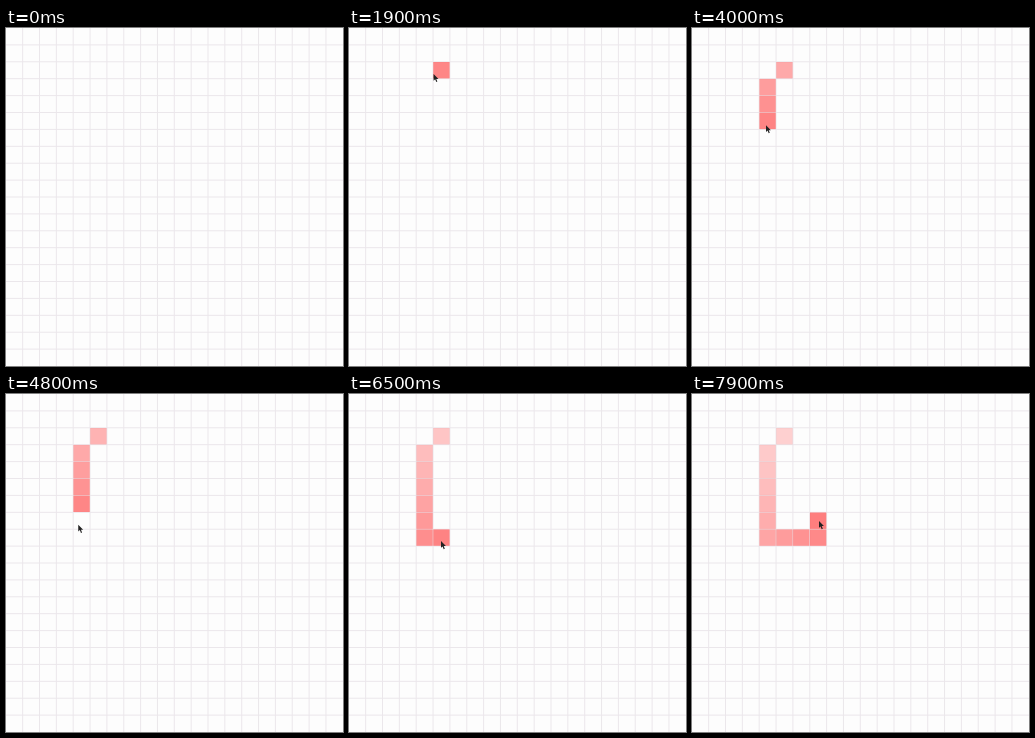
Write an HTML page that moves like this. It is 337 px wide and 338 px high and loops after 8 s.

```html
<!DOCTYPE html>
<html lang="en">
<head>
<meta charset="utf-8">
<title>Grid trail</title>
<style>
html, body { margin: 0; width: 100%; height: 100%; overflow: hidden; background: #fdfdfd; }
svg { display: block; width: 100%; height: 100%; }
</style>
</head>
<body>
<svg viewBox="0 0 337 338">
  <rect width="337" height="338" fill="#fdfdfd"/>
  <g id="grid" fill="#ebe7eb"></g>
  <g id="cells" fill="#f00"></g>
  <path id="cursor" d="M0 0V6.8L1.6 5.4 2.7 8.2 3.8 7.7 2.7 5H4.9Z" fill="#222"/>
</svg>
<script>
const LOOP = 8000, STEP = 100, COLS = 20;
const PX = 16.85, PY = 16.9;
const ENTER = 300, ARRIVE = 1100;
const byId = id => document.getElementById(id);

// Where the pointer clicks, after its entry point
const entry = [11, 159];
const stops = [
  [87, 37], [81, 59], [75, 78], [74, 97], [74, 108], [72, 134],
  [73, 143], [92, 147], [113, 145], [125, 143], [127, 127]
];

// Clicks follow each other ever faster
const clickTime = i => 1500 + 780 * i - 14 * i * i;

const ramp = (t, a, b) => Math.min(1, Math.max(0, (t - a) / (b - a)));
const smooth = k => k * k * (3 - 2 * k);
const mix = (a, b, k) => a.map((v, i) => v + (b[i] - v) * k);

function rect(parent, x, y, width, height) {
  const el = document.createElementNS("http://www.w3.org/2000/svg", "rect");
  for (const [k, v] of Object.entries({ x, y, width, height })) el.setAttribute(k, v);
  return byId(parent).appendChild(el);
}

for (let i = 1; i < COLS; i++) {
  rect("grid", i * PX - 0.7, 0, 1, 338);
  rect("grid", 0, i * PY - 0.5, 337, 1);
}

// Each click fills the square under the pointer
const cells = stops.map(([x, y]) =>
  rect("cells", Math.floor(x / PX) * PX, Math.floor(y / PY) * PY + 0.2, PX - 0.5, PY - 0.5));

function pointerAt(t) {
  if (t < clickTime(0)) return mix(entry, stops[0], ramp(t, ENTER, ARRIVE));
  const i = stops.findLastIndex((_, n) => t >= clickTime(n));
  const next = stops[i + 1] || stops[i];
  const part = ramp(t, clickTime(i), clickTime(i + 1));
  return mix(stops[i], next, smooth(ramp(part, 0.4, 0.68)));
}

function draw(t) {
  cells.forEach((el, i) => {
    const age = (t - clickTime(i)) / 1000;
    el.setAttribute("opacity", age < 0 ? 0 : 0.5 * Math.exp(-0.16 * age));
  });
  const cursor = byId("cursor");
  cursor.setAttribute("visibility", t < ENTER ? "hidden" : "visible");
  cursor.setAttribute("transform", `translate(${pointerAt(t)})`);
}

const start = performance.now();
function tick() {
  const t = (performance.now() - start) % LOOP;
  draw(Math.floor(t / STEP) * STEP);
  requestAnimationFrame(tick);
}
tick();
</script>
</body>
</html>
```
